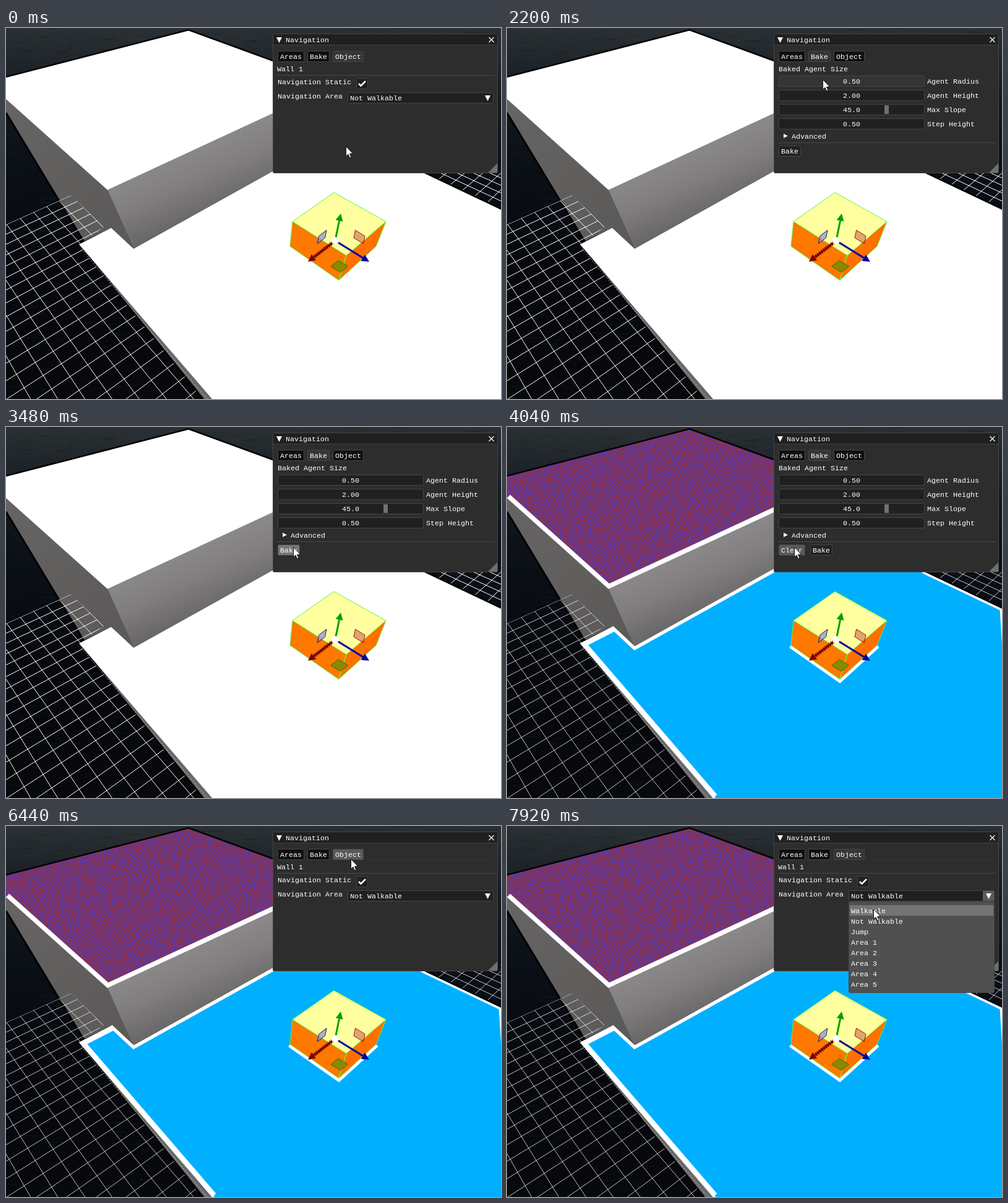
An HTML page with a canvas that plays this animation: 800x600 px, repeating every 8000 ms.

```html
<!DOCTYPE html>
<html lang="en">
<head>
<meta charset="utf-8">
<title>Navigation bake</title>
<style>
html, body { margin: 0; height: 100%; overflow: hidden; background: #080b10; }
canvas { display: block; }
</style>
</head>
<body>
<canvas id="stage" width="800" height="600"></canvas>
<script>
const LOOP = 8000, BAKED = 4040, POPUP = 7440;
const ctx = document.getElementById('stage').getContext('2d');

// ---------- helpers ----------
function poly(c, pts, fill, stroke, width = 1, open = false) {
  c.beginPath();
  pts.forEach(p => c.lineTo(...p));
  if (!open) c.closePath();
  if (fill) { c.fillStyle = fill; c.fill(); }
  if (stroke) { c.strokeStyle = stroke; c.lineWidth = width; c.stroke(); }
}

function line(c, pts, color, width = 1) {
  poly(c, pts, null, color, width, true);
}

function clipped(c, pts, draw) {
  c.save();
  poly(c, pts);
  c.clip();
  draw();
  c.restore();
}

function dashed(c, dash, pts, color, width) {
  c.setLineDash(dash);
  line(c, pts, color, width);
  c.setLineDash([]);
}

function rect(x, y, w, h, fill) {
  ctx.fillStyle = fill;
  ctx.fillRect(x, y, w, h);
}

function gradient(c, from, to, ...colors) {
  const g = c.createLinearGradient(...from, ...to);
  colors.forEach((color, i) => g.addColorStop(i / (colors.length - 1), color));
  return g;
}

function seeded(seed) {
  return () => (seed = (seed * 16807) % 2147483647) / 2147483647;
}

// ---------- perspective ----------
const RIGHT = [1435, -328], LEFT = [-480, -315], DOWN = [412, 820];

// Point at the given x on the line from p to a vanishing point.
function along(p, vanish, x) {
  return [x, p[1] + (vanish[1] - p[1]) * (x - p[0]) / (vanish[0] - p[0])];
}

// Point h pixels below p on its vertical edge.
function drop(p, h) {
  return [p[0] + (DOWN[0] - p[0]) * h / (DOWN[1] - p[1]), p[1] + h];
}

// Wall: near, left, back and right corners of the top, and its foot.
const near = [164, 262], left = along(near, LEFT, 0), right = along(near, RIGHT, 440);
const rim = [[0, 79], [295, 3], [440, 56]];
const foot = drop(near, 95), footRight = along(foot, RIGHT, 440);
const wallTop = [...rim, right, near, left];
const outline = [[0, 137], drop([0, 137], 208)];

// Floor: back corner, its notch at the wall, far edge and near edge.
const corner = [118, 350], notch = along(corner, RIGHT, 170);
const far = [676, 235], farEnd = along(far, LEFT, 800), edgeEnd = [333, 600];
const floor = [corner, notch, foot, footRight, [660, 225], far, farEnd, [820, 620], [350, 620], edgeEnd];

// ---------- 3D view ----------
function makeScene(isBaked) {
  const canvas = document.createElement('canvas');
  canvas.width = 800;
  canvas.height = 600;
  const c = canvas.getContext('2d');
  drawSea(c);
  drawWall(c, isBaked);
  const brim = along([0, 318], RIGHT, 105);
  drawGrid(c, [[0, 318], brim, [158, 322], corner, edgeEnd, [0, 600]], isBaked);
  drawGrid(c, [[676, 231], [800, 231], farEnd, far], isBaked);
  drawFloor(c, isBaked);
  drawBox(c, isBaked);
  drawGizmo(c);
  return canvas;
}

function drawSea(c) {
  c.fillStyle = gradient(c, [0, 0], [0, 600], '#2a3033', '#12181e', '#0a0f16', '#07090e', '#06080d', '#07090c');
  c.fillRect(0, 0, 800, 600);
  const rnd = seeded(7);
  for (let i = 0; i < 900; i++) {
    const x = rnd() * 800, y = rnd() * 600, w = 6 + rnd() * 24;
    line(c, [[x, y], [x + w, y + rnd() * 4 - 2]], i % 2 ? 'rgba(120,140,155,.07)' : 'rgba(0,0,0,.16)', 1.5);
  }
}

// Two fans of lines, evenly spaced where they cross the bottom.
function drawGrid(c, area, dim) {
  const bottom = 635;
  clipped(c, area, () => {
    c.globalAlpha = dim ? 0.75 : 1;
    for (let k = -40; k < 60; k++) {
      const a = RIGHT[0] - (2.221 - k * 0.052) * (bottom - RIGHT[1]);
      const b = LEFT[0] + (1 - k * 0.048) * (bottom - LEFT[1]);
      line(c, [RIGHT, [a, bottom]], '#fff');
      line(c, [LEFT, [b, bottom]], '#fff');
    }
  });
}

function drawWall(c, isBaked) {
  poly(c, [left, near, foot, notch, outline[1], outline[0]], gradient(c, left, foot, '#676464', '#5b5858'));
  line(c, outline, '#000', 3);
  poly(c, [near, right, footRight, foot], gradient(c, [282, 190], [330, 300], '#8d8b8b', '#807e7e', '#686666'));
  poly(c, wallTop, '#fff');
  if (isBaked) {
    clipped(c, wallTop, () => {
      drawFlicker(c);
      line(c, [left, near, right], '#fff', 15);
    });
  }
  line(c, rim, '#000', 2.5);
}

// Two coplanar surfaces fighting for depth.
function drawFlicker(c) {
  const rnd = seeded(31);
  c.fillStyle = '#5a3aa6';
  c.fillRect(0, 0, 440, 262);
  c.fillStyle = '#8c3044';
  for (let y = 0; y < 262; y++) {
    for (let x = y % 2; x < 440; x += 2) {
      const wave = Math.sin(x * 0.5 + y * 1.9 + 3 * Math.sin(x * 0.05 - y * 0.13));
      if (wave * 0.5 + rnd() * 2 - 1 > 0) c.fillRect(x, y, 2, 1);
    }
  }
}

function drawFloor(c, isBaked) {
  poly(c, [corner, edgeEnd, [319, 600]], '#6a6868');
  line(c, [corner, [319, 600]], '#000', 2);
  dashed(c, [3, 2], [[122, 357], [325, 600]], 'rgba(225,225,225,.7)', 1);
  line(c, [far, farEnd], '#000', 5);
  poly(c, floor, isBaked ? '#00b0ff' : '#fff');
  if (isBaked) {
    line(c, [notch, foot, footRight], '#fff', 4);
    clipped(c, floor, () => {
      poly(c, floor, null, '#fff', 7);
      line(c, [edgeEnd, corner, notch], '#fff', 17);
    });
  }
}

function drawBox(c, isBaked) {
  const front = [550, 368], west = [463, 313], east = [614, 313], back = [530, 266];
  const base = [west, front, east].map(p => drop(p, 40));
  if (isBaked) line(c, base, '#fff', 10);
  poly(c, [west, front, base[1], base[0]], '#ff7800');
  poly(c, [front, east, base[2], base[1]], '#ff7000');
  poly(c, [west, back, east, front], '#ffffa0');
  const edge = '#62f53c';
  poly(c, [base[0], west, back, east, base[2], base[1]], null, edge);
  line(c, [west, front, east], edge);
  line(c, [front, base[1]], edge, 1.5);
}

function drawGizmo(c) {
  const hub = [532, 344];
  const up = [9, -44], blue = [55, 34], red = [-44, 34];
  const at = (a, s, b, t) => hub.map((h, i) => h + a[i] * s + b[i] * t);

  function handle(a, b, fill, stroke) {
    const lo = 0.47, hi = 0.75;
    poly(c, [at(a, lo, b, lo), at(a, hi, b, lo), at(a, hi, b, hi), at(a, lo, b, hi)], fill, stroke);
  }
  function arrow(axis, color) {
    const len = Math.hypot(...axis), side = [-axis[1], axis[0]];
    const neck = 1 - 12 / len, wide = 6 / len;
    line(c, [hub, at(axis, neck, side, 0)], color, 3);
    poly(c, [at(axis, 1, side, 0), at(axis, neck, side, wide), at(axis, neck, side, -wide)], color);
  }

  handle(red, up, 'rgba(150,150,215,.75)', '#1c1c55');
  handle(blue, up, 'rgba(190,80,50,.5)', '#a01010');
  handle(red, blue, '#8a8a00', '#3c6c00');
  arrow(up, '#00a000');
  arrow(blue, '#0000a0');
  arrow(red, '#780000');
  dashed(c, [2, 2], [hub, at(red, 0.8, up, 0)], '#780000', 6);
  c.beginPath();
  c.arc(...hub, 6, 0, 7);
  c.fillStyle = '#fff';
  c.fill();
}

// ---------- panel widgets ----------
const DARK = '#202020', HOT = '#5a5a5a', INSET = 439;
let pointer, popupOpen;

function text(str, x, mid) {
  ctx.fillStyle = '#fff';
  ctx.fillText(str, x, mid + 4);
}

function frame(x, y, w, h, fill) {
  ctx.beginPath();
  ctx.roundRect(x + 0.5, y + 0.5, w - 1, h - 1, 2);
  ctx.fillStyle = fill;
  ctx.fill();
  ctx.strokeStyle = '#464646';
  ctx.lineWidth = 1;
  ctx.stroke();
}

function hovered(x, y, w, h) {
  const [px, py] = pointer;
  return !popupOpen && px >= x && px < x + w && py >= y && py < y + h;
}

function field(x, y) {
  const hot = hovered(x, y, 236, 18);
  frame(x, y, 236, 18, hot ? '#343434' : DARK);
  return hot;
}

// Draws a button and returns its right edge.
function button(label, x, y, base, pressed) {
  const w = label.length * 7 + 8, hot = hovered(x, y, w, 18);
  frame(x, y, w, 18, hot ? (pressed ? '#777' : HOT) : base);
  text(label, x + 4, y + 9);
  return x + w;
}

function rule(y, color = '#484848') {
  rect(438, y, 352, 1, color);
}

// Triangle pointing down, or right when turned.
function caret(x, y, size, turned) {
  const tip = turned ? [x + size, y + size / 2] : [x + size / 2, y + size];
  poly(ctx, [[x, y], tip, turned ? [x, y + size] : [x + size, y]], '#fff');
}

function bakeTab(t) {
  text('Baked Agent Size', INSET, 66);
  const values = { 'Agent Radius': '0.50', 'Agent Height': '2.00', 'Max Slope': '45.0', 'Step Height': '0.50' };
  Object.entries(values).forEach(([label, value], i) => {
    const y = 77 + i * 23;
    field(INSET, y);
    if (label === 'Max Slope') rect(610, y + 2, 7, 14, '#707070');
    text(value, 543, y + 9);
    text(label, 679, y + 9);
  });
  if (hovered(INSET, 168, 348, 14)) rect(INSET, 168, 348, 14, HOT);
  caret(447, 171, 7, true);
  text('Advanced', 460, 175);
  rule(185);
  const x = t < BAKED ? INSET : button('Clear', INSET, 190, '#232323') + 8;
  button('Bake', x, 190, '#232323', t >= 3440);
}

function objectTab() {
  text('Wall 1', 438, 66);
  rule(76);
  text('Navigation Static', INSET, 87);
  frame(566, 81, 19, 18, DARK);
  line(ctx, [[570, 90], [573.5, 93.5], [581, 86]], '#fff', 2.5);
  text('Navigation Area', INSET, 110);
  if (field(552, 104) || popupOpen) rect(769, 105, 18, 16, HOT);
  text('Not Walkable', 556, 113);
  caret(774, 109, 9);
}

function popup() {
  frame(552, 122, 236, 148, '#505050');
  const items = ['Walkable', 'Not Walkable', 'Jump'];
  for (let i = 1; i <= 5; i++) items.push('Area ' + i);
  items.forEach((item, i) => {
    const y = 128 + i * 17;
    if (pointer[1] >= y && pointer[1] < y + 17) rect(554, y, 232, 17, '#747474');
    text(item, 556, y + 9);
  });
}

function panel(t) {
  const view = t >= 1800 && t < 6200 ? 'Bake' : 'Object';
  frame(431, 9, 364, 226, '#2d2d2d');
  rect(432, 10, 362, 17, DARK);
  rect(432, 27, 362, 1, '#404040');
  caret(437, 15, 9);
  text('Navigation', 452, 19);
  for (const s of [-4, 4]) line(ctx, [[784.5 - s, 15], [784.5 + s, 23]], '#fff', 1.2);
  poly(ctx, [[779, 234], [794, 219], [794, 234]], '#707070');

  rule(54, '#363636');
  let x = INSET;
  for (const tab of ['Areas', 'Bake', 'Object']) {
    const pressed = tab !== view && (t >= 1720 && t < 1800 || t >= 6120 && t < 6200);
    x = button(tab, x, 37, tab === view ? '#363636' : '#0f0f0f', pressed) + 5;
  }
  if (view === 'Bake') bakeTab(t); else objectTab();
  if (popupOpen) popup();
}

// ---------- pointer ----------
// Each move: first change, last change, destination; one step per 80 ms.
const START = [549, 191], STEP = 80;
const MOVES = [
  [760, 1240, 508, 46], [2040, 2200, 510, 83], [2280, 3040, 464, 194],
  [4880, 5040, 511, 131], [5120, 5520, 552, 45], [5680, 5800, 553, 42],
  [6440, 6840, 578, 108], [7040, 7160, 589, 112], [7840, 7920, 592, 134]
];

function pointerAt(t) {
  let [x, y] = START;
  for (const [from, to, tx, ty] of MOVES) {
    if (t < from) break;
    const steps = (to - from) / STEP + 1;
    const p = Math.min(1, (Math.floor((t - from) / STEP) + 1) / steps);
    x += (tx - x) * p;
    y += (ty - y) * p;
  }
  return [Math.round(x), Math.round(y)];
}

function drawPointer() {
  ctx.save();
  ctx.translate(pointer[0] + 0.5, pointer[1] + 0.5);
  poly(ctx, [[0, 0], [0, 16], [3.5, 12.8], [6, 18.5], [8.5, 17.5], [6, 11.8], [11, 11.5]], '#fff', '#111');
  ctx.restore();
}

// ---------- playback ----------
const plain = makeScene(false), baked = makeScene(true);
const began = performance.now();

function render(t) {
  pointer = pointerAt(t);
  popupOpen = t >= POPUP;
  ctx.font = '11.667px "Liberation Mono", monospace';
  ctx.drawImage(t >= BAKED ? baked : plain, 0, 0);
  panel(t);
  drawPointer();
}

function tick() {
  render((performance.now() - began) % LOOP);
  requestAnimationFrame(tick);
}
tick();
</script>
</body>
</html>
```
